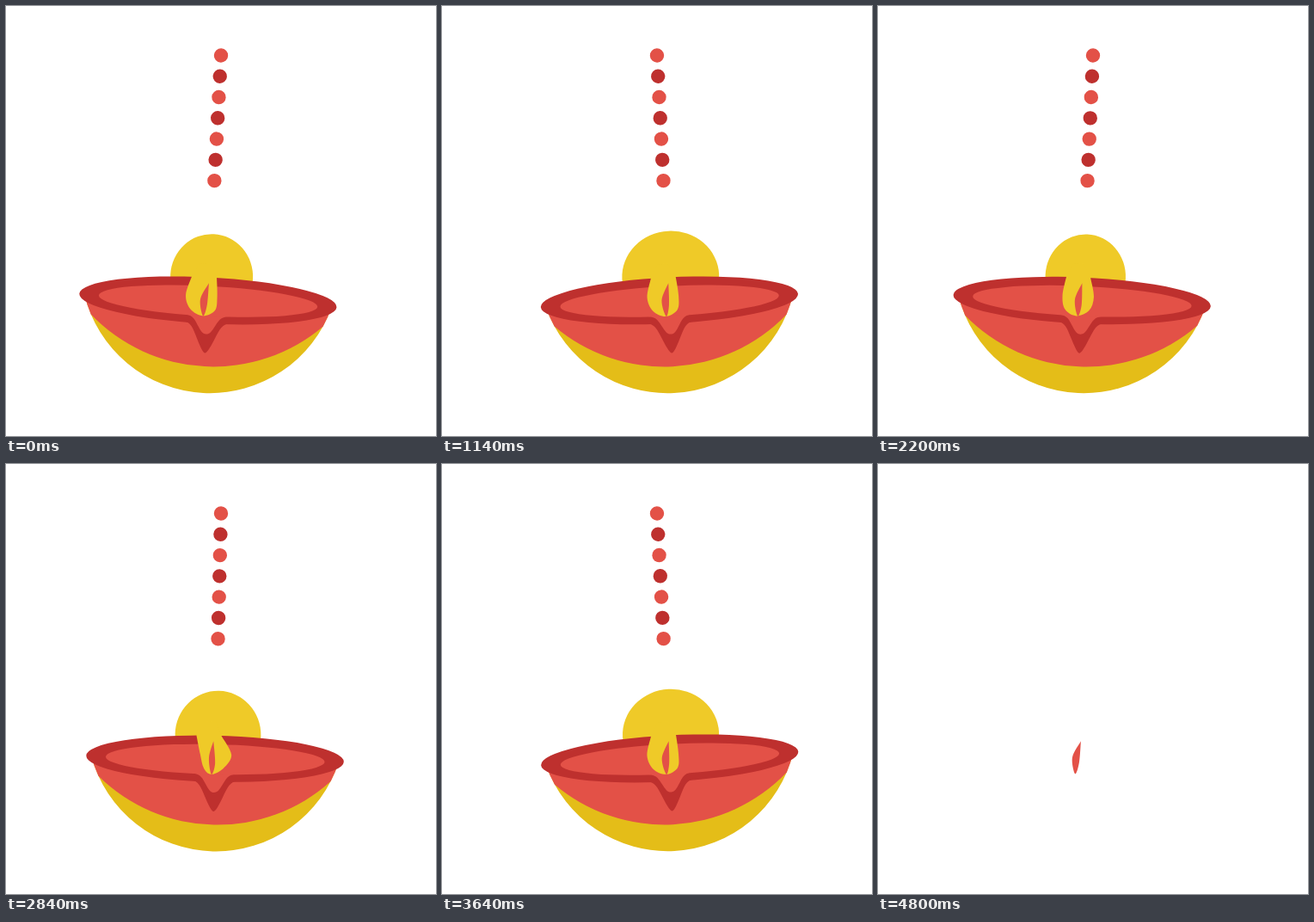
These frames come from a looping animation (500x500 px, 4820 ms). An HTML page:

```html
<!DOCTYPE html>
<html lang="en">
<head>
<meta charset="utf-8">
<title>Swinging lamp</title>
<style>
  html, body { margin: 0; width: 100%; height: 100%; overflow: hidden; background: #fff; }
  svg { display: block; width: 100vw; height: 100vh; }
  .red { fill: #e35147; }
  .dark { fill: #be302e; }
  .glow { fill: #efca28; }
  .base { fill: #e4bd18; }
</style>
</head>
<body>
<svg viewBox="0 0 500 500">
  <g id="swing">
    <g id="lamp">
      <g id="beads"></g>
      <ellipse id="halo" class="glow" cx="252.6" cy="315"/>
      <path class="base" d="M105.8 343A150.2 150.2 0 0 0 393.8 343Z"/>
      <path class="red" d="M105.8 343A150.2 150.2 0 0 0 114.7 366A197 197 0 0 0 384.9 366A150.2 150.2 0 0 0 393.8 343Z"/>
      <ellipse class="dark" cx="249.8" cy="342.8" rx="149.8" ry="26.9"/>
      <path class="dark" d="M221.5 368C231.5 369 233.5 375 239.5 388C244.5 399 247.5 404 249.5 404S254.5 399 259.5 388C265.5 375 267.5 369 277.5 368Z"/>
      <ellipse class="red" cx="250" cy="343.5" rx="127.3" ry="17.5"/>
      <path class="red" d="M223.5 360C234.5 361 235.5 366 240.5 374C244.5 381 246.5 382 249.5 382S254.5 381 258.5 374C263.5 366 264.5 361 275.5 360Z"/>
      <path id="flame" class="glow"/>
    </g>
    <path id="core" class="red"/>
  </g>
</svg>
<script>
const LOOP = 4820, DELAY = 20, END = 4780, HALF = 1200, PIVOT = 57.5;
const el = id => document.getElementById(id);
const swing = el('swing'), lamp = el('lamp'), halo = el('halo'), flame = el('flame'), core = el('core');

for (let i = 0; i < 7; i++) {
  el('beads').innerHTML +=
    `<circle cx="250" cy="${PIVOT + i * 24.3}" r="8.2" class="${i % 2 ? 'dark' : 'red'}"/>`;
}

// Heights of the key points, going down the left side and up the right
const flameY = [316, 338, 354, 361, 354, 338, 316];
const coreY = [322.5, 342, 361, 348, 322.5];

// Three poses per swing: when, and the x of each key point
const rest = { flame: [229.5, 223.7, 230, 244.8, 258.5, 260.3, 258.6], core: [249.8, 240.8, 245, 249, 249.8] };
const lean = { flame: [227.5, 232.5, 237, 245.5, 259.5, 268.8, 256.5], core: [247.5, 242.7, 246, 250, 247.5] };
const rise = { flame: [231.7, 232, 231.5, 242.5, 258.5, 268.3, 258.5], core: [247.8, 242.5, 246.3, 250.3, 247.8] };
const poses = [[0, rest], [400, lean], [680, rise], [HALF, rest]];

function pose(part, phase) {
  const i = poses.findIndex(([end]) => phase < end);
  const [t0, a] = poses[i - 1], [t1, b] = poses[i];
  const mix = (1 - Math.cos(Math.PI * (phase - t0) / (t1 - t0))) / 2;
  return a[part].map((x, k) => x + (b[part][k] - x) * mix);
}

// Smooth open curve through the points
function curve(xs, ys) {
  const n = xs.length - 1;
  const at = i => { const k = Math.max(0, Math.min(n, i)); return [xs[k], ys[k]]; };
  let d = `M${at(0)}`;
  for (let i = 0; i < n; i++) {
    const [p, a, b, q] = [at(i - 1), at(i), at(i + 1), at(i + 2)];
    const c1 = a.map((v, k) => v + (b[k] - p[k]) / 6);
    const c2 = b.map((v, k) => v - (q[k] - a[k]) / 6);
    d += `C${c1} ${c2} ${b}`;
  }
  return d;
}

function draw(t) {
  const turn = Math.PI * t / HALF;
  swing.setAttribute('transform', `rotate(${3 * Math.cos(turn)} 250 ${PIVOT})`);
  lamp.setAttribute('visibility', t < END ? 'visible' : 'hidden');

  const pulse = Math.sin(turn - 1.1);
  halo.setAttribute('rx', 50.7 + 4.6 * pulse + 1.4 * Math.cos(2 * turn));
  halo.setAttribute('ry', 51.2 + 1.8 * pulse);

  const phase = t % HALF;
  flame.setAttribute('d', curve(pose('flame', phase), flameY) + 'L250 300L238 300Z');
  core.setAttribute('d', curve(pose('core', phase), coreY) + 'Z');
}

function tick() {
  draw(Math.max(0, performance.now() % LOOP - DELAY));
  requestAnimationFrame(tick);
}
tick();
</script>
</body>
</html>
```
